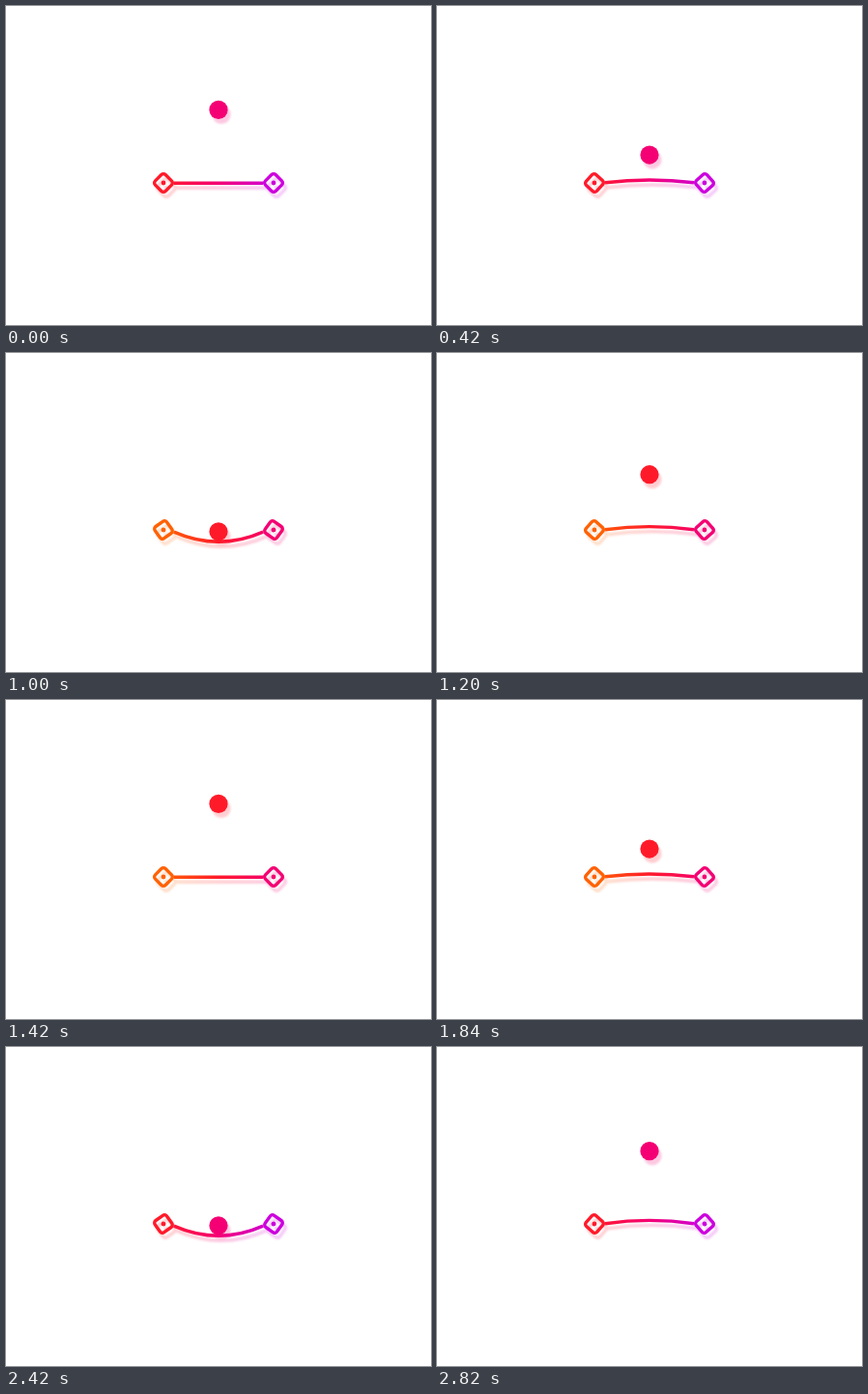
An HTML page that plays this animation: 440x330 px, repeating every 2840 ms.

```html
<!DOCTYPE html>
<html lang="en">
<head>
<meta charset="utf-8">
<title>Bouncing ball</title>
<style>
  html, body { margin: 0; width: 100%; height: 100%; overflow: hidden; background: #fff; }
  svg { display: block; width: 440px; height: 330px; }
</style>
</head>
<body>
<svg viewBox="0 0 440 330">
  <defs>
    <filter id="shadow" filterUnits="userSpaceOnUse" x="0" y="0" width="440" height="330" color-interpolation-filters="sRGB">
      <feGaussianBlur in="SourceGraphic" stdDeviation="1"/>
      <feOffset dx="2.5" dy="5"/>
      <feComponentTransfer result="soft"><feFuncA type="linear" slope=".22"/></feComponentTransfer>
      <feMerge><feMergeNode in="soft"/><feMergeNode in="SourceGraphic"/></feMerge>
    </filter>
    <linearGradient id="blend" gradientUnits="userSpaceOnUse" x1="163" y1="0" x2="277" y2="0">
      <stop/><stop offset=".5"/><stop offset="1"/>
    </linearGradient>
  </defs>
  <g filter="url(#shadow)" fill="none" stroke-width="3.4">
    <path id="line" stroke="url(#blend)"/>
    <g class="knot">
      <rect x="-7.5" y="-7.5" width="15" height="15" rx="3" transform="rotate(45)"/>
      <circle r="2.4" stroke="none"/>
    </g>
    <g class="knot">
      <rect x="-7.5" y="-7.5" width="15" height="15" rx="3" transform="rotate(45)"/>
      <circle r="2.4" stroke="none"/>
    </g>
    <circle id="ball" cx="220" r="9.6"/>
  </g>
</svg>
<script>
const HALF = 1420, LEVEL = 183.3, LEFT = 163, RIGHT = 277, ARM = 11;
const CONTACT = LEVEL - 10.5, RELEASE = 1037, REST = -3.3;
const palette = [[255, 98, 4], [255, 26, 42], [244, 0, 116], [204, 0, 222]];

// Ball height over one bounce: [ms, y]
const path = [
  [0, 107.4], [100, 108.5], [200, 113.6], [310, 130], [420, 153.8], [540, 185],
  [640, 198], [770, 202.4], [900, 198.5], [1000, 185], [1080, 157.2],
  [1180, 130], [1280, 114], [1400, 107.7], [1420, 107.4]
];

const line = document.getElementById('line');
const ball = document.getElementById('ball');
const knots = document.querySelectorAll('.knot');
const stops = document.querySelectorAll('stop');
const clamp = v => Math.min(1, Math.max(0, v));

function slope(i) {
  if (i === 0 || i === path.length - 1) return 0;
  const [a, b] = [path[i - 1], path[i + 1]];
  return (b[1] - a[1]) / (b[0] - a[0]);
}

function ballY(t) {
  let i = 0;
  while (i < path.length - 2 && t >= path[i + 1][0]) i++;
  const [t0, y0] = path[i], [t1, y1] = path[i + 1];
  const d = t1 - t0, u = (t - t0) / d, v = 1 - u;
  return v * v * ((1 + 2 * u) * y0 + u * d * slope(i)) +
         u * u * ((1 + 2 * v) * y1 - v * d * slope(i + 1));
}

// Sag of the string: carried by the ball, then a damped swing
function sag(t, y) {
  if (t < RELEASE) return Math.max(REST * (1 - Math.exp(-t / 60)), y - CONTACT);
  const u = t - RELEASE;
  const swing = 14 * Math.exp(-u / 130) * Math.sin(2 * Math.PI * u / 160);
  const settle = REST * (1 - Math.exp(-u / 60));
  return (settle - swing) * clamp((HALF - t) / 20);
}

function color(k) {
  const i = Math.min(2, Math.floor(k)), f = k - i;
  return `rgb(${palette[i].map((c, j) => Math.round(c + (palette[i + 1][j] - c) * f))})`;
}

function draw(now) {
  const time = now % (2 * HALF), t = time % HALF;
  const y = ballY(t), bow = sag(t, y);

  const p = clamp((t - 540) / 400), ease = p * p * (3 - 2 * p);
  const shift = time < HALF ? ease : 1 - ease;
  const colors = [1, 2, 3].map(k => color(k - shift));
  stops.forEach((s, i) => s.setAttribute('stop-color', colors[i]));

  const angle = bow * 0.8, rad = angle * Math.PI / 180;
  const dx = ARM * Math.cos(rad), endY = LEVEL + ARM * Math.sin(rad);
  const controlY = 2 * (LEVEL + bow) - endY;
  line.setAttribute('d', `M${LEFT + dx} ${endY}Q220 ${controlY} ${RIGHT - dx} ${endY}`);

  knots.forEach((k, i) => {
    k.setAttribute('transform', `translate(${i ? RIGHT : LEFT} 183) rotate(${i ? -angle : angle})`);
    k.setAttribute('stroke', colors[2 * i]);
    k.lastElementChild.setAttribute('fill', colors[2 * i]);
  });
  ball.setAttribute('cy', y);
  ball.setAttribute('fill', colors[1]);
}

const start = performance.now();
function tick() {
  draw(performance.now() - start);
  requestAnimationFrame(tick);
}
tick();
</script>
</body>
</html>
```
